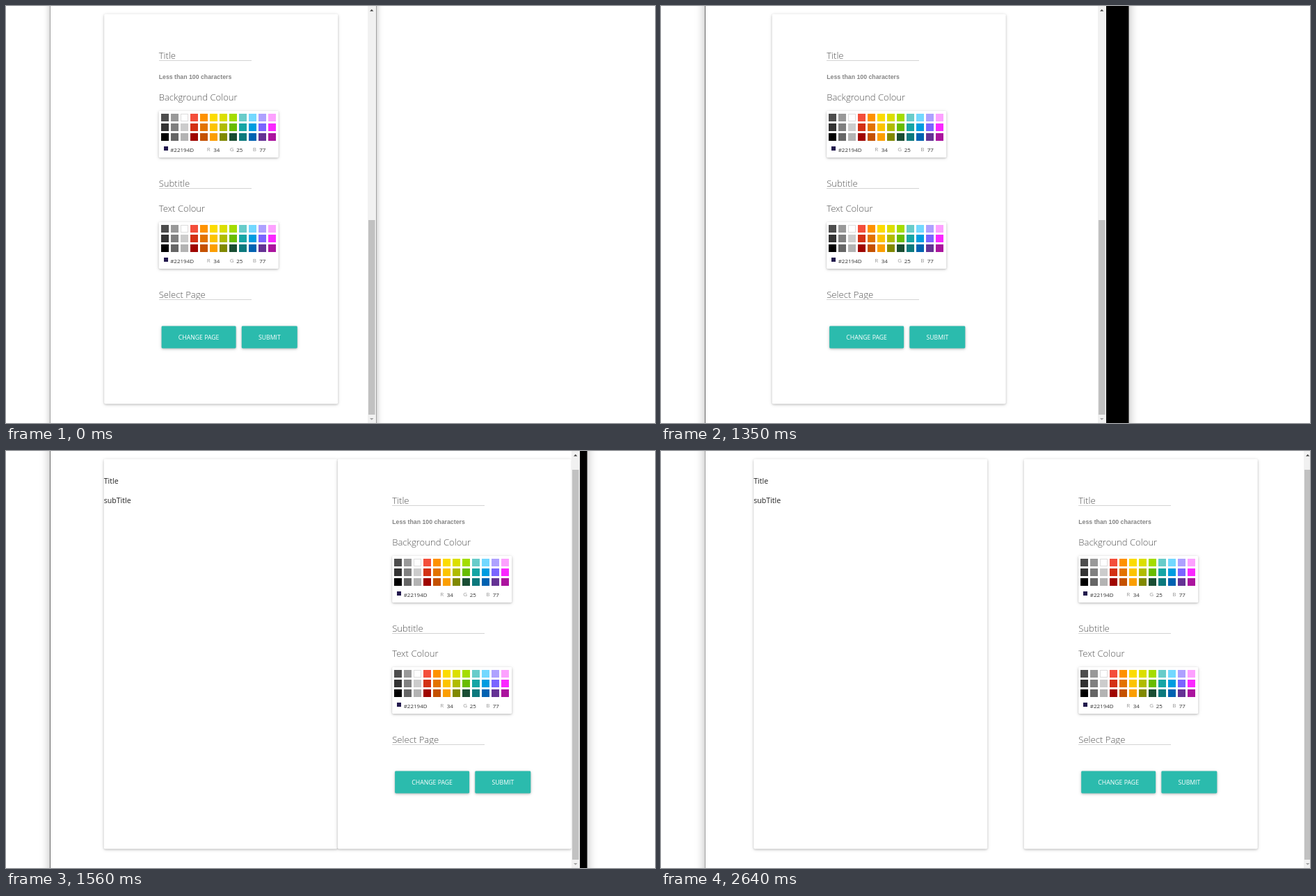
Recreate the animation shown at these times as an HTML page. Size 933 by 600 pixels, loop 2760 ms.

```html
<!DOCTYPE html>
<html>
<head>
<meta charset="utf-8">
<style>
html, body { margin: 0; width: 100%; height: 100%; overflow: hidden; background: #fff; }
#stage { position: relative; width: 100%; height: 100%; overflow: hidden; contain: paint; }
#win { position: absolute; top: -20px; bottom: -20px; left: 63px; box-sizing: border-box;
  border: 1px solid; background: #000; }
#page { position: absolute; top: 0; left: 64px; height: 100%; background: #fff; overflow: hidden; }
svg { position: absolute; top: 0; left: 0; display: block; }
text { font: 300 13.1px "Open Sans", sans-serif; fill: #555; }
.hint { font: bold 8.75px "Liberation Sans", Arial, sans-serif; fill: #858585; }
.val { font-size: 8px; font-weight: 400; fill: #333; }
.key { font-size: 8px; font-weight: 400; fill: #999; }
.btn { font-size: 8.7px; font-weight: 400; fill: #fff; }
.body { font-size: 10.6px; font-weight: 400; fill: #222; }
.raised { filter: drop-shadow(0 1.4px 1.75px rgba(0,0,0,.2)) drop-shadow(0 1px 2.5px rgba(0,0,0,.12)); }
.crisp { shape-rendering: crispEdges; }
</style>
</head>
<body>
<div id="stage">
  <div id="win"></div>
  <div id="page">
    <svg width="869" height="600">
      <g id="preview"></g>
      <g id="form"></g>
      <g id="bar">
        <rect width="12" height="600" fill="#f1f1f1"/>
        <rect id="thumb" x="1" width="9.5" fill="#c1c1c1"/>
        <path d="M3 7.5h5.4L5.7 4.7z" fill="#404040"/>
        <path d="M3 593h5.4L5.7 595.8z" fill="#a0a0a0"/>
      </g>
    </svg>
  </div>
</div>
<script>
const $ = id => document.getElementById(id);
const CARD = 336;
const SWATCHES = [
  '4D4D4D 999999 FFFFFF F44E3B FE9200 FCDC00 DBDF00 A4DD00 68CCCA 73D8FF AEA1FF FDA1FF',
  '333333 808080 CCCCCC D33115 E27300 FCC400 B0BC00 68BC00 16A5A5 009CE0 7B64FF FA28FF',
  '000000 666666 B3B3B3 9F0500 C45100 FB9E00 808900 194D33 0C797D 0062B1 653294 AB149E'
].map(row => row.split(' '));

const rect = (x, y, w, h, fill, cls = '', more = '') =>
  `<rect x="${x}" y="${y}" width="${w}" height="${h}" fill="${fill}" class="${cls}" ${more}/>`;
const text = (x, y, s, cls = '') => `<text x="${x}" y="${y}" class="${cls}">${s}</text>`;

const card = () => rect(0, 11.5, CARD, 561, '#fff', 'raised', 'rx="2"');
const field = (y, s) => text(78.5, y, s) + rect(78.5, y + 2, 133, 1, '#d4d4d4', 'crisp');
const button = (x, w, s) =>
  rect(x, 460.5, w, 32, '#2bbbad', 'raised', 'rx="1.4"') + text(x + 24.2, 480, s, 'btn');

function picker(y) {
  let out = rect(78.5, y, 172, 67, '#fff', 'raised', 'rx="1.4"');
  SWATCHES.forEach((row, j) => row.forEach((c, i) => {
    const x = 81.5 + 14 * i, top = y + 4 + 14 * j;
    out += c == 'FFFFFF'
      ? rect(x, top, 11, 11, '#ddd', 'crisp') + rect(x + 1, top + 1, 9, 9, '#fff', 'crisp')
      : rect(x, top, 11, 11, '#' + c, 'crisp');
  }));
  out += rect(85.5, y + 51, 6, 6, '#22194D', 'crisp') + text(95, y + 59, '#22194D', 'val');
  [['R', 34], ['G', 25], ['B', 77]].forEach(([k, v], i) => {
    out += text(147.5 + 33 * i, y + 58, k, 'key') + text(157 + 33 * i, y + 59, v, 'val');
  });
  return out;
}

$('preview').innerHTML = card() + text(0, 47, 'Title', 'body') + text(0, 75, 'subTitle', 'body');
$('form').innerHTML = card() +
  field(76, 'Title') + text(78.5, 105, 'Less than 100 characters', 'hint') +
  text(78.5, 136, 'Background Colour') + picker(151) +
  field(260, 'Subtitle') + text(78.5, 296, 'Text Colour') + picker(311) +
  field(420, 'Select Page') +
  button(82.4, 107, 'CHANGE PAGE') + button(197.6, 80, 'SUBMIT');

// Right edges of the dragged window and of the page that lags behind it: [ms, x]
const WINDOW = [[1110, 533], [1170, 543], [1230, 572], [1440, 749], [1560, 836], [1650, 920], [1770, 945]];
const PAGE = [[1110, 532], [1170, 538], [1230, 566], [1440, 695], [1560, 825], [1650, 905], [1770, 936]];

function at(keys, t) {
  const i = keys.findIndex(k => k[0] > t);
  if (i == 0) return keys[0][1];
  if (i < 0) return keys[keys.length - 1][1];
  const [t0, a] = keys[i - 1], [t1, b] = keys[i];
  return a + (b - a) * (t - t0) / (t1 - t0);
}

const move = (id, x) => $(id).setAttribute('transform', `translate(${x} 0)`);

function layout(width) {
  const wide = width >= 745;
  let left, gap = 0;
  if (!wide) left = Math.min((width - CARD) / 2 + 17.2, 95.7);
  else if (width < 820) left = 76.7;
  else {
    gap = (0.9035 * width - 2 * CARD) / 2;
    left = 0.05 * width + gap / 2;
  }
  $('preview').style.display = wide ? '' : 'none';
  move('preview', left);
  move('form', wide ? left + CARD + gap : left);
  move('bar', width);
  const top = wide ? 27 : 308;
  $('thumb').setAttribute('y', top);
  $('thumb').setAttribute('height', 588 - top);
}

function draw(now) {
  const t = Math.floor(now % 2760 / 30) * 30;
  const edge = Math.round(at(PAGE, t));
  const win = $('win').style;
  win.width = Math.round(at(WINDOW, t)) - 63 + 'px';
  win.borderColor = t >= 1050 && t < 2640 ? '#6a6a6a' : '#a0a0a0';
  win.boxShadow = t >= 1050 ? '0 0 13px rgba(0,0,0,.3)' : '0 0 9px rgba(0,0,0,.28)';
  $('page').style.width = edge - 64 + 'px';
  layout(edge - 76);
}

let start;
function tick(now) {
  start ??= now;
  draw(now - start);
  requestAnimationFrame(tick);
}
draw(0);
requestAnimationFrame(tick);
</script>
</body>
</html>
```
